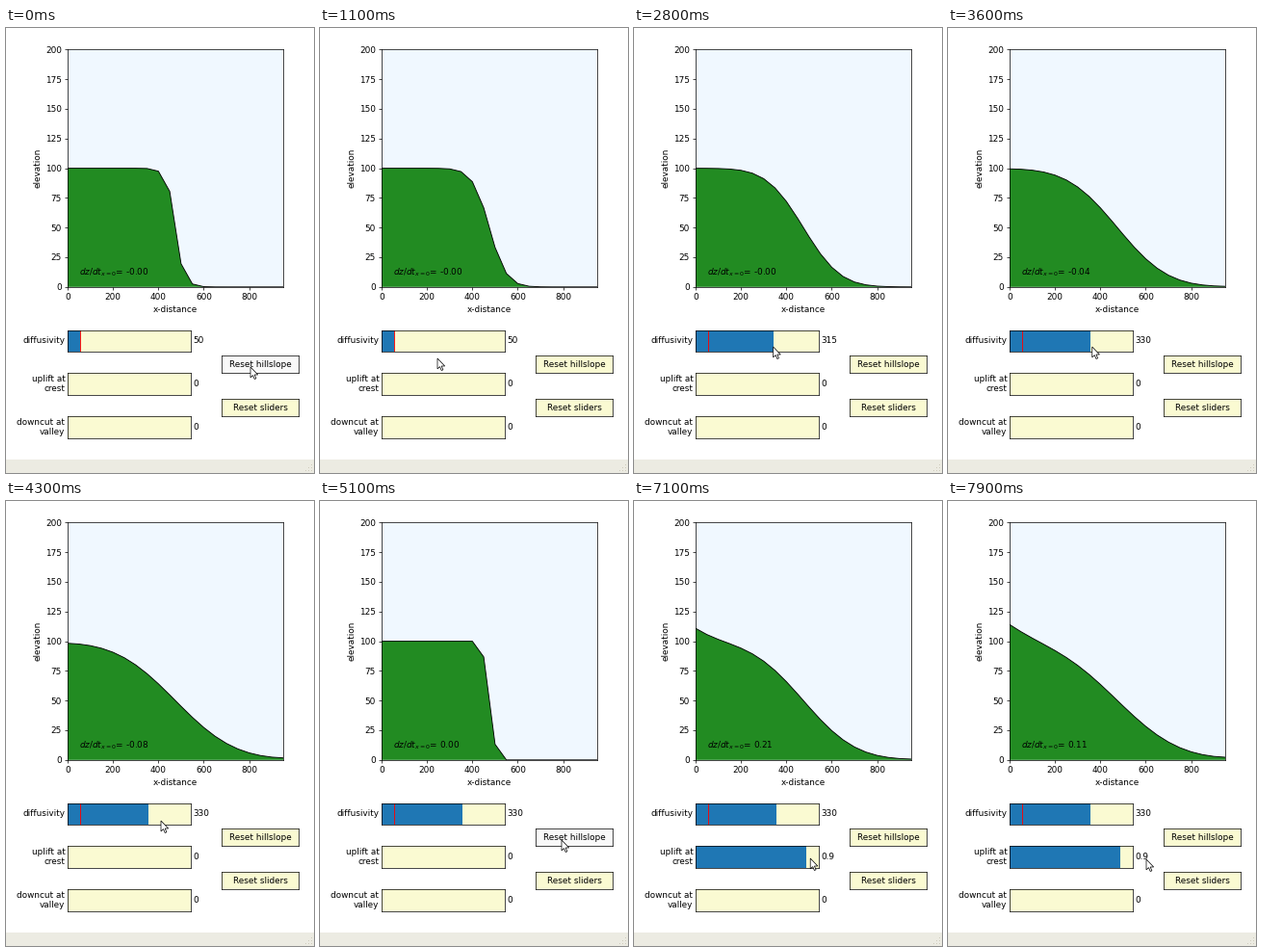
Write a matplotlib script that moves like this. It is 320 px wide and 462 px high and loops after 8 s.

```python
import numpy as np
import matplotlib.pyplot as plt
from matplotlib.animation import FuncAnimation
from matplotlib.patches import Polygon, Rectangle

W, H, PLOT_H, DPI = 320, 462, 448, 64
FRAMES, INTERVAL = 80, 100
CREAM, HOVER = "lightgoldenrodyellow", "0.975"
DX, RESET = 50, 51

x = np.arange(0, 1000, DX)


def track(*keys):
    """Linear motion through (frame, value) keys, one value per frame."""
    t, v = zip(*keys)
    return np.interp(np.arange(FRAMES), t, v)


def snap(values, step):
    return np.round(np.round(values / step) * step, 4)


diffusivity = snap(track((19, 50), (26.5, 315), (28, 315), (31, 330)), 5)
uplift = snap(track((58, 0), (62, 0.75), (63, 0.75), (67, 0.9)), 0.05)

path = [(0, 254, 352), (2, 250, 365), (3, 243, 388), (4, 228, 390),
        (5, 205, 390), (7, 150, 384), (9, 115, 376), (10, 117, 358),
        (11, 122, 343), (15, 95, 332), (18, 78, 325), (19, 77, 325),
        (26.5, 144.6, 331), (28, 144.6, 331), (31, 148.5, 331),
        (37, 150, 331), (43, 161, 332), (45, 165, 344), (46, 180, 345),
        (48, 215, 350), (49, 240, 352), (51, 251, 352), (53, 222, 366),
        (54, 185, 372), (56, 110, 372), (58, 66, 371), (62, 160, 370),
        (63, 170, 370), (67, 180, 371), (72, 184, 371), (79, 206, 372)]
mouse_x = track(*[(f, px) for f, px, _ in path])
mouse_y = track(*[(f, py) for f, _, py in path])


def simulate():
    """Explicit hillslope diffusion with closed ends and uplift at the crest."""
    before = track((0, 14), (28, 88), (43, 128), (50, 146)).astype(int)
    after = track((RESET, 1), (63, 30), (79, 72)).astype(int)
    start = np.where(x < 500, 100.0, 0.0)
    states = []
    for i in range(FRAMES):
        if i in (0, RESET):
            z, done = start.copy(), 0
        total = (before if i < RESET else after)[i]
        for _ in range(total - done):
            flux = diffusivity[i] / DX**2 * np.diff(z)
            rate = flux[0] + uplift[i]
            z[:-1] += flux
            z[1:] -= flux
            z[0] += uplift[i]
        done = total
        states.append((z.copy(), rate))
    return states


states = simulate()

fig = plt.figure(figsize=(W / DPI, H / DPI), dpi=DPI, facecolor="white")


def add_axes(left, bottom, width, height, color):
    pad = H - PLOT_H
    return fig.add_axes([left, (pad + bottom * PLOT_H) / H,
                         width, height * PLOT_H / H], facecolor=color)


def add_slider(bottom, label, top, initial):
    ax = add_axes(0.2, bottom, 0.4, 0.05, CREAM)
    ax.set(xlim=(0, top), ylim=(0, 1), xticks=[], yticks=[])
    bar = ax.add_patch(Rectangle((0, 0), 0, 1, color="tab:blue", lw=0))
    if initial:
        ax.axvline(initial, color="r", lw=1)
    ax.text(-0.02, 0.5, label, transform=ax.transAxes, ha="right", va="center")
    value = ax.text(1.02, 0.5, "0", transform=ax.transAxes, va="center")
    return bar, value


def add_button(bottom, label):
    ax = add_axes(0.7, bottom, 0.25, 0.04, CREAM)
    ax.set(xticks=[], yticks=[])
    ax.text(0.5, 0.5, label, transform=ax.transAxes, ha="center", va="center")
    return ax, (1 - bottom - 0.04) * PLOT_H, (1 - bottom) * PLOT_H


plot = add_axes(0.2, 0.4, 0.7, 0.55, "aliceblue")
plot.set(xlim=(0, 950), ylim=(0, 200), xlabel="x-distance", ylabel="elevation",
         xticks=range(0, 801, 200), yticks=range(0, 201, 25))
hill = plot.add_patch(Polygon([(0, 0), (1, 0), (1, 1)], fc="forestgreen", lw=0))
crest_line, = plot.plot([], [], "k", lw=1)
rate_text = plot.text(50, 10, "")

sliders = [add_slider(0.25, "diffusivity", 500, 50),
           add_slider(0.15, "uplift at\ncrest", 1, 0),
           add_slider(0.05, "downcut at\nvalley", 1, 0)]
buttons = [add_button(0.2, "Reset hillslope"), add_button(0.1, "Reset sliders")]

# Pixel overlay for the window's status bar and the mouse pointer
over = fig.add_axes([0, 0, 1, 1], zorder=10)
over.set(xlim=(0, W), ylim=(H, 0))
over.axis("off")
over.add_patch(Rectangle((0, PLOT_H), W, H - PLOT_H, color="#ecebe2", lw=0))
for row in range(3):
    for col in range(row + 1):
        over.add_patch(Rectangle((317 - 3 * col, 453 + 3 * row), 1.3, 1.3,
                                 color="#cfccbd", lw=0))

ARROW = np.array([(0, 0), (0, 10.9), (2.5, 8.6), (4.2, 12.5),
                  (5.9, 11.8), (4.2, 8), (7.7, 8)])
pointer = over.add_patch(Polygon(ARROW, fc="white", ec="black", lw=0.8))


def draw(i):
    z, rate = states[i]
    hill.set_xy([(0, 0), *zip(x, z), (x[-1], 0)])
    crest_line.set_data(x, z)
    rate_text.set_text(f"$dz/dt_{{x=0}}$= {rate:.2f}")

    for (bar, text), value in zip(sliders, (diffusivity[i], uplift[i], 0)):
        bar.set_width(value)
        text.set_text(f"{value:g}")

    mx, my = mouse_x[i], mouse_y[i]
    for ax, top, bottom in buttons:
        inside = 224 <= mx <= 304 and top <= my <= bottom
        ax.set_facecolor(HOVER if inside else CREAM)
    pointer.set_xy(ARROW + (mx, my))
    return ()


anim = FuncAnimation(fig, draw, frames=FRAMES, interval=INTERVAL,
                     repeat=True, repeat_delay=0)
plt.show()
```
